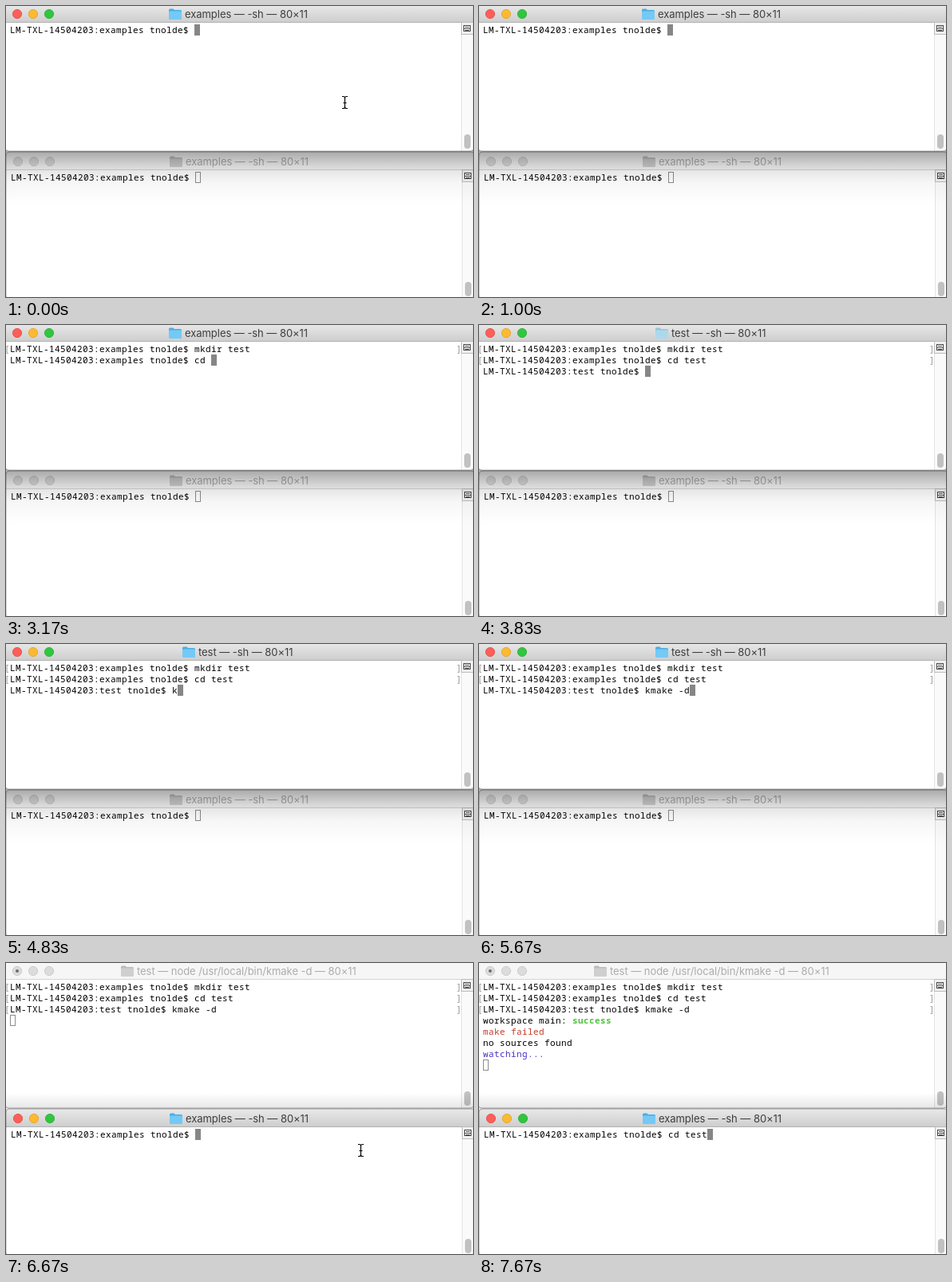
An HTML page for the animation above (8000 ms loop, 585 by 365 pixels).

```html
<!DOCTYPE html>
<html lang="en">
<head>
<meta charset="utf-8">
<title>Two terminals</title>
<style>
  html, body { margin: 0; width: 100%; height: 100%; overflow: hidden; background: #fff; }
  svg { display: block; width: 585px; height: 365px; }
  text { white-space: pre; }
  .mono { font: 500 11px "Noto Sans Mono", "DejaVu Sans Mono", monospace; letter-spacing: .4px; }
  .title { font: 13px Inter, Roboto, sans-serif; letter-spacing: -.05px; }
</style>
</head>
<body>
<svg viewBox="0 0 585 365" xmlns="http://www.w3.org/2000/svg">
  <defs>
    <linearGradient id="bar" x2="0" y2="1">
      <stop stop-color="#e9e9e9"/><stop offset="1" stop-color="#cecece"/>
    </linearGradient>
    <linearGradient id="below" x2="0" y2="1">
      <stop stop-opacity=".36"/><stop offset=".15" stop-opacity=".25"/>
      <stop offset=".33" stop-opacity=".12"/><stop offset=".6" stop-opacity=".035"/>
      <stop offset="1" stop-opacity="0"/>
    </linearGradient>
    <linearGradient id="above" x2="0" y2="1">
      <stop stop-opacity="0"/><stop offset="1" stop-opacity=".12"/>
    </linearGradient>
  </defs>
  <g id="scene"></g>
</svg>
<script>
const LOOP = 8000, CELL = 7, ROW = 14, LEFT = 5;
const scene = document.getElementById('scene');
const prompt = dir => `LM-TXL-14504203:${dir} tnolde$ `;

// Part of a command visible at a tick; counts give its length tick by tick.
function typed(tick, start, cmd, counts) {
  if (tick < start) return '';
  return cmd.slice(0, counts[Math.min(tick - start, counts.length - 1)]);
}

function mono(x, row, str, fill = '#000', extra = '') {
  return `<text class="mono" x="${x}" y="${34 + row * ROW}" fill="${fill}" ${extra}>${str}</text>`;
}

function folder(x, active, busy) {
  const [back, front] = !active ? ['#bcbcbc', '#cfcfcf']
    : busy ? ['#94c6de', '#add8ec'] : ['#4aaee2', '#74c9f5'];
  return `<path d="M${x} 16V5q0-1.500 1.500-1.500h4l1.500 1.500h7.500q1.500 0 1.500 1.500V16z" fill="${back}"/>
    <rect x="${x}" y="6.500" width="16" height="10.500" rx="1.200" fill="${front}"/>`;
}

function lights(active, busy) {
  const fills = active ? ['#fc5f59', '#fdb932', '#30c63f'] : Array(3).fill('#dcdcdc');
  const rims = active ? ['#e0473f', '#dfa024', '#24aa30'] : Array(3).fill('#c5c5c5');
  const dot = busy ? `<circle cx="14" cy="10" r="2" fill="${active ? '#7a0c08' : '#6c6c6c'}"/>` : '';
  return fills.map((fill, i) =>
    `<circle cx="${14 + i * 20}" cy="10" r="5.600" fill="${fill}" stroke="${rims[i]}" stroke-width=".8"/>`
  ).join('') + dot;
}

const scroller = `
  <path d="M570 21h16v156q0 5-5 5h-11z" fill="#fafafa"/>
  <path d="M570.500 21V182" stroke="#e3e3e3"/>
  <rect x="570.500" y="20.500" width="15" height="15" fill="#f1f1f1" stroke="#bdbdbd"/>
  <rect x="573.500" y="24.500" width="8" height="7" fill="#fff" stroke="#444"/>
  <path d="M575 26.500h5M574 28.500h7M575 30.500h5" stroke="#555"/>
  <rect x="574" y="161" width="8" height="18" rx="4" fill="#c1c1c1"/>`;

function caret(col, row, active) {
  const x = LEFT + col * CELL, y = 23 + row * ROW;
  return active
    ? `<rect x="${x}" y="${y}" width="7" height="14" fill="#868686"/>`
    : `<rect x="${x + .5}" y="${y + .5}" width="6" height="13" fill="none" stroke="#8c8c8c"/>`;
}

function terminal(w) {
  const shape = 'M-1 3q0-5 5-5H581q5 0 5 5V177q0 5-5 5H4q-5 0-5-5z';
  const last = w.lines.length - 1;
  const body = w.lines.map((line, i) => {
    const marks = line.mark ? mono(-2, i, '[', '#999') + mono(564, i, ']', '#999') : '';
    return marks + mono(LEFT, i, line.str, line.fill);
  }).join('');
  return `<g transform="translate(${w.x} ${w.y})">
    <path d="${shape}" fill="#fff"/>
    <path d="M-1 20V3q0-5 5-5H581q5 0 5 5V20z" fill="${w.active ? 'url(#bar)' : '#f6f6f6'}"/>
    <path d="M-1 20.500H586" stroke="${w.active ? '#b1b1b1' : '#d5d5d5'}"/>
    ${scroller}
    <path d="${shape}" fill="none" stroke="#000" stroke-opacity=".32"/>
    ${lights(w.active, w.dot)}${folder(w.titleX - 20, w.active, w.faded)}
    <text class="title" x="${w.titleX}" y="15" fill="${w.active ? '#3d3d3d' : '#acacac'}">${w.title}</text>
    ${caret(w.lines[last].cols ?? w.lines[last].str.length, last, w.active)}${body}
  </g>`;
}

function ibeam(x, y) {
  const d = 'M-3.500-7.500h1.500Q0-7.500 0-5.500Q0-7.500 2-7.500h1.500M0-5.500V5.500M-3.500 7.500h1.500Q0 7.500 0 5.500Q0 7.500 2 7.500h1.500M-2 .500H2';
  return `<g transform="translate(${x + .5} ${y})" fill="none">
    <path d="${d}" stroke="#fff" stroke-opacity=".8" stroke-width="2.600"/>
    <path d="${d}" stroke="#000" stroke-width="1.200"/></g>`;
}

function arrow(x, y) {
  return `<path transform="translate(${x} ${y})" d="M.500 0V14.500L4 11.300L6.300 16.500L8.800 15.400L6.500 10.400H11z"
    fill="#000" stroke="#fff" stroke-width="1"/>`;
}

function upperLines(tick) {
  const lines = [{ str: prompt('examples') + typed(tick, 10, 'mkdir test', [1, 2, 4, 6, 7, 10]), mark: tick >= 16 }];
  if (tick >= 16)
    lines.push({ str: prompt('examples') + typed(tick, 17, 'cd test', [1, 2, 3, 4, 5, 7]), mark: tick >= 23 });
  if (tick >= 23)
    lines.push({ str: prompt('test') + typed(tick, 29, 'kmake -d', [1, 2, 3, 5, 6, 8]), mark: tick >= 35 });
  if (tick >= 44) lines.push(
    { str: 'workspace main: <tspan fill="#4fc43e" font-weight="700">success</tspan>' },
    { str: 'make failed', fill: '#c23a2b' },
    { str: 'no sources found' },
    { str: 'watching...', fill: '#4a34bd' });
  if (tick >= 35) lines.push({ str: '' });
  return lines;
}

function upperTitle(tick) {
  if (tick < 23) return ['examples — -sh — 80×11', 224];
  if (tick < 36) return ['test — -sh — 80×11', 241];
  return ['test — node /usr/local/bin/kmake -d — 80×11', 164];
}

function pointer(tick) {
  if (tick < 2) return ibeam(424, 121);
  if (tick === 38) return ibeam(432, 165);
  if (tick === 39) return arrow(443, 233);
  if (tick === 40 || tick === 41) return ibeam(444, 235);
  return '';
}

function draw(tick) {
  const swapped = tick >= 40, running = tick >= 36;
  const [title, titleX] = upperTitle(tick);
  const upper = terminal({
    x: 0, y: 0, active: !swapped, title, titleX, lines: upperLines(tick),
    dot: running || (tick >= 3 && tick < 6),
    faded: running || tick === 23 || (tick >= 4 && tick < 6)
  });
  const lower = terminal({
    x: 1, y: 185, active: swapped, title: 'examples — -sh — 80×11', titleX: 224,
    lines: [{ str: prompt('examples') + typed(tick, 42, 'cd test', [1, 2, 4, 5, 7]) }]
  });
  const below = '<rect y="178" width="585" height="72" fill="url(#below)"/>';
  const above = '<rect y="163" width="585" height="24" fill="url(#above)"/>';
  scene.innerHTML = (swapped ? upper + above + lower : lower + below + upper) + pointer(tick);
}

let shown = -1;
const began = performance.now();
function frame() {
  const t = (performance.now() - began) % LOOP;
  const tick = Math.floor(t * .006 + .05); // six steps a second
  if (tick !== shown) draw(shown = tick);
  requestAnimationFrame(frame);
}
frame();
</script>
</body>
</html>
```
